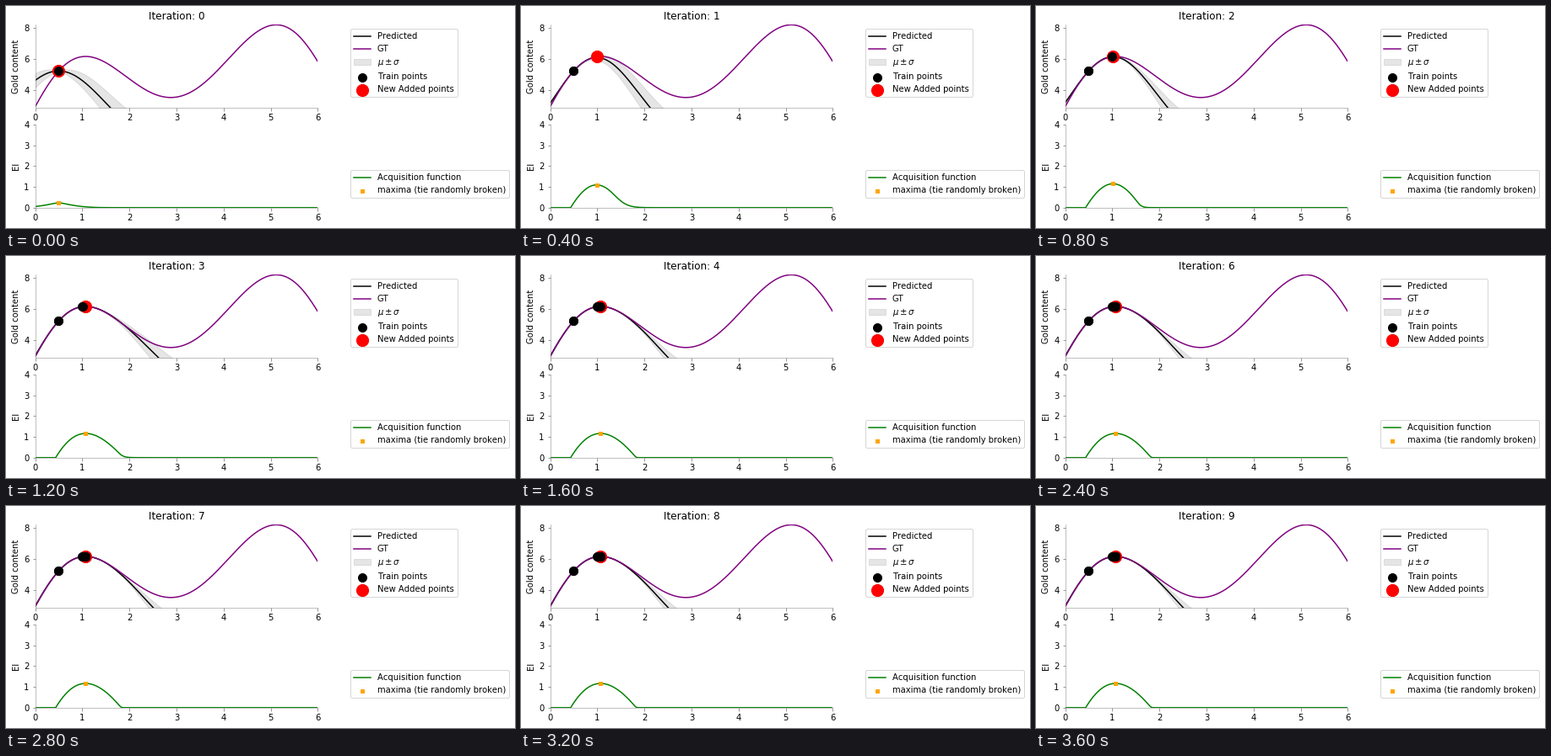
These frames come from a looping animation (603 by 264 pixels, 4000 ms). A matplotlib script:

```python
import math

import matplotlib.pyplot as plt
import numpy as np
from matplotlib.animation import FuncAnimation

W, H, DPI = 603, 264, 72
STEPS = 10
JITTER = 1e-10
INCUMBENT = 5.01
FLOOR = 2.85

# Ground truth: a sextic given by its stationary points
gt = np.poly1d(0.0649 * np.poly([1.0725, 2.88, 5.12, 6.838, -0.797])).integ(k=2.92)
grid = np.linspace(0, 6, 1000)
truth = gt(grid)
erf = np.vectorize(math.erf)


def rbf(a, b):
    return np.exp(-0.5 * (a[:, None] - b[None, :]) ** 2)


def posterior(xs):
    """Mean and deviation of a unit RBF process through gt(xs)."""
    gram = rbf(xs, xs) + JITTER * np.eye(len(xs))
    cross = rbf(grid, xs)
    mean = cross @ np.linalg.solve(gram, gt(xs))
    var = 1 - np.sum(cross * np.linalg.solve(gram, cross.T).T, axis=1)
    return mean, np.sqrt(np.maximum(var, 1e-12))


def expected_improvement(mean, sd):
    gain = mean - INCUMBENT
    z = gain / sd
    cdf = 0.5 * (1 + erf(z / math.sqrt(2)))
    pdf = np.exp(-0.5 * z ** 2) / math.sqrt(2 * math.pi)
    return gain * cdf + sd * pdf


def optimise():
    xs, steps = np.array([0.5]), []
    for _ in range(STEPS):
        mean, sd = posterior(xs)
        ei = expected_improvement(mean, sd)
        best = np.argmax(ei)
        steps.append((xs, mean, sd, ei, best))
        xs = np.append(xs, grid[best])
    return steps


def panel(top, ylabel, ylim, yticks):
    left, width, height = 34.5, 334.8, 98.84
    ax = fig.add_axes([left / W, 1 - (top + height) / H, width / W, height / H])
    ax.set(xlim=(0, 6), ylim=ylim, ylabel=ylabel,
           xticks=range(7), yticks=yticks)
    for side in ("top", "right"):
        ax.spines[side].set_visible(False)
    for side in ("left", "bottom"):
        ax.spines[side].set(color="gray", linewidth=0.5)
    ax.tick_params(direction="out", color="gray")
    return ax


def add_legend(ax, handles, y):
    ax.legend(handles=handles, loc="upper left", bbox_to_anchor=(1.1, y))


plt.rcParams.update({"font.family": "DejaVu Sans", "font.size": 10,
                     "text.kerning_factor": 6})
fig = plt.figure(figsize=(W / DPI, H / DPI), dpi=DPI, facecolor="white")

top = panel(22.36, "Gold content", (FLOOR, truth.max()), (4, 6, 8))
low = panel(140.96, "EI", (0, 4), range(5))
title = top.set_title("")

pred, = top.plot(grid, truth, color="black", label="Predicted")
real, = top.plot(grid, truth, color="purple", label="GT")
band = top.fill_between(grid, truth, truth, color="gray", alpha=0.2,
                        label=r"$\mu \pm \sigma$")
added = top.scatter([0.5], [gt(0.5)], s=200, color="red", zorder=9,
                    label="New Added points")
train = top.scatter([0.5], [gt(0.5)], s=100, color="black", zorder=10,
                    label="Train points")
add_legend(top, [pred, real, band, train, added], 1)

acq, = low.plot(grid, 0 * grid, color="green", label="Acquisition function")
peak = low.scatter([0.5], [0], s=15, marker="s", color="orange", zorder=10,
                   label="maxima (tie randomly broken)")
add_legend(low, [acq, peak], 0.5)

history = optimise()


def update(i):
    xs, mean, sd, ei, best = history[i]
    title.set_text(f"Iteration: {i}")
    pred.set_ydata(mean)
    outline = np.concatenate([mean + sd, (mean - sd)[::-1]])
    band.set_verts([np.column_stack([np.append(grid, grid[::-1]), outline])])
    train.set_offsets(np.column_stack([xs, gt(xs)]))
    added.set_offsets([[grid[best], truth[best]]])
    acq.set_ydata(ei)
    peak.set_offsets([[grid[best], ei[best]]])
    return title, pred, band, train, added, acq, peak


anim = FuncAnimation(fig, update, frames=STEPS, interval=400,
                     repeat=True, repeat_delay=0)
plt.show()
```
